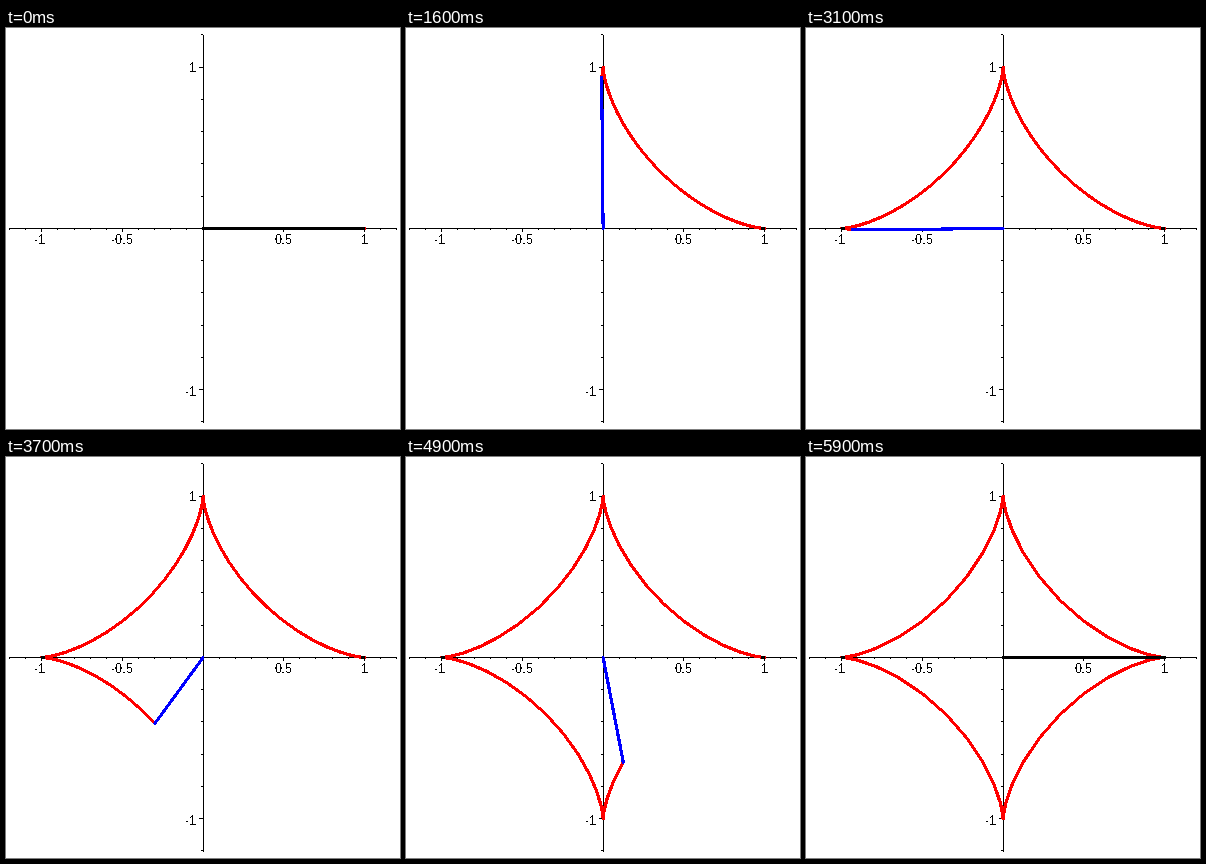
Animation of 394x401 px, one loop 6 s. Source, as a matplotlib script:

```python
import numpy as np
import matplotlib as mpl
import matplotlib.pyplot as plt
from matplotlib.animation import FuncAnimation
from matplotlib.collections import LineCollection
from matplotlib.patches import Rectangle

W, H, DPI = 394, 401, 100
FRAMES, INTERVAL = 60, 100
SCALE = 161.25
PX = 72 / DPI          # points per pixel
PEN = 2.1              # pen size along the pixel grid
FLAT = 0.0012          # strokes this close to the x axis merge with it
RED, BLUE, BLACK = "#ff0000", "#0000ff", "#000000"

mpl.rcParams.update({
    "font.family": "Liberation Sans",
    "text.antialiased": False,
    "text.hinting": "native",
    "text.hinting_factor": 1,
    "path.snap": False,
})

fig = plt.figure(figsize=(W / DPI, H / DPI), dpi=DPI, facecolor="white")
ax = fig.add_axes([0, 0, 1, 1])
ax.set_xlim(0, W)
ax.set_ylim(H, 0)
ax.axis("off")


def to_px(x, y):
    return 197.1 + SCALE * x, 200.4 - SCALE * y


def block(x, y, w, h):
    ax.add_patch(Rectangle((x, y), w, h, fc=BLACK, lw=0,
                           antialiased=False, zorder=1))


def label(x, y, text):
    ax.text(x, y, text, fontsize=13 * PX, ha="center", va="baseline")


def stroke(z):
    lines = LineCollection([], antialiased=False, capstyle="round", zorder=z)
    ax.add_collection(lines, autolim=False)
    return lines


def trace(lines, x, y, color):
    """Join the points; the pen gets thinner on diagonals."""
    pts = np.column_stack([x, y])
    segs = np.stack([pts[:-1], pts[1:]], axis=1)
    step = np.abs(np.diff(pts, axis=0))
    length = np.maximum(np.hypot(*step.T), 1e-9)
    lines.set_segments(segs)
    lines.set_linewidths(PEN * PX * step.max(axis=1) / length)
    lines.set_color(color)


def draw_axes():
    block(3, 200, 388, 1)
    block(197, 7, 1, 388)
    for i in range(-12, 13):
        x = int(to_px(i / 10, 0)[0])
        if i:
            block(x, 201, 1, 3 if i % 5 == 0 else 1)
    for i in range(-6, 7):
        y = int(to_px(0, i / 5)[1])
        size = 4 if abs(i) == 5 else 2
        if i:
            block(197 - size, y, size, 1)
    for x, text in ((33.5, "-1"), (116, "-0.5"), (278, "0.5"), (359, "1")):
        label(x, 216, text)
    label(187, 44, "1")
    label(185, 368, "-1")


def astroid(t):
    return np.cos(t) ** 3, np.sin(t) ** 3


draw_axes()
curve = stroke(3)
tips, = ax.plot([], [], color=BLACK, lw=PEN * PX, antialiased=False,
                solid_capstyle="butt", zorder=4)
radius = stroke(5)


def update(n):
    end = np.radians(6 * (n + 1))

    # 48 chords, with the cusps always kept sharp
    cusps = np.arange(5) * np.pi / 2
    t = np.union1d(np.linspace(0, end, 49), cusps[cusps <= end])
    trace(curve, *to_px(*astroid(t)), RED)

    x, y = astroid(np.linspace(0, end, 721))
    x = np.where(np.abs(y) < FLAT, x, np.nan)
    tips.set_data(to_px(x, y)[0], np.full_like(x, 200.5))

    x, y = astroid(end)
    px, py = to_px(x, y)
    flat = abs(y) < FLAT
    trace(radius, [197.1, px], [200.5, 200.5 if flat else py],
          BLACK if flat else BLUE)
    return curve, tips, radius


anim = FuncAnimation(fig, update, frames=FRAMES, interval=INTERVAL,
                     init_func=lambda: update(0), repeat=True,
                     repeat_delay=0, blit=False)
plt.show()
```
